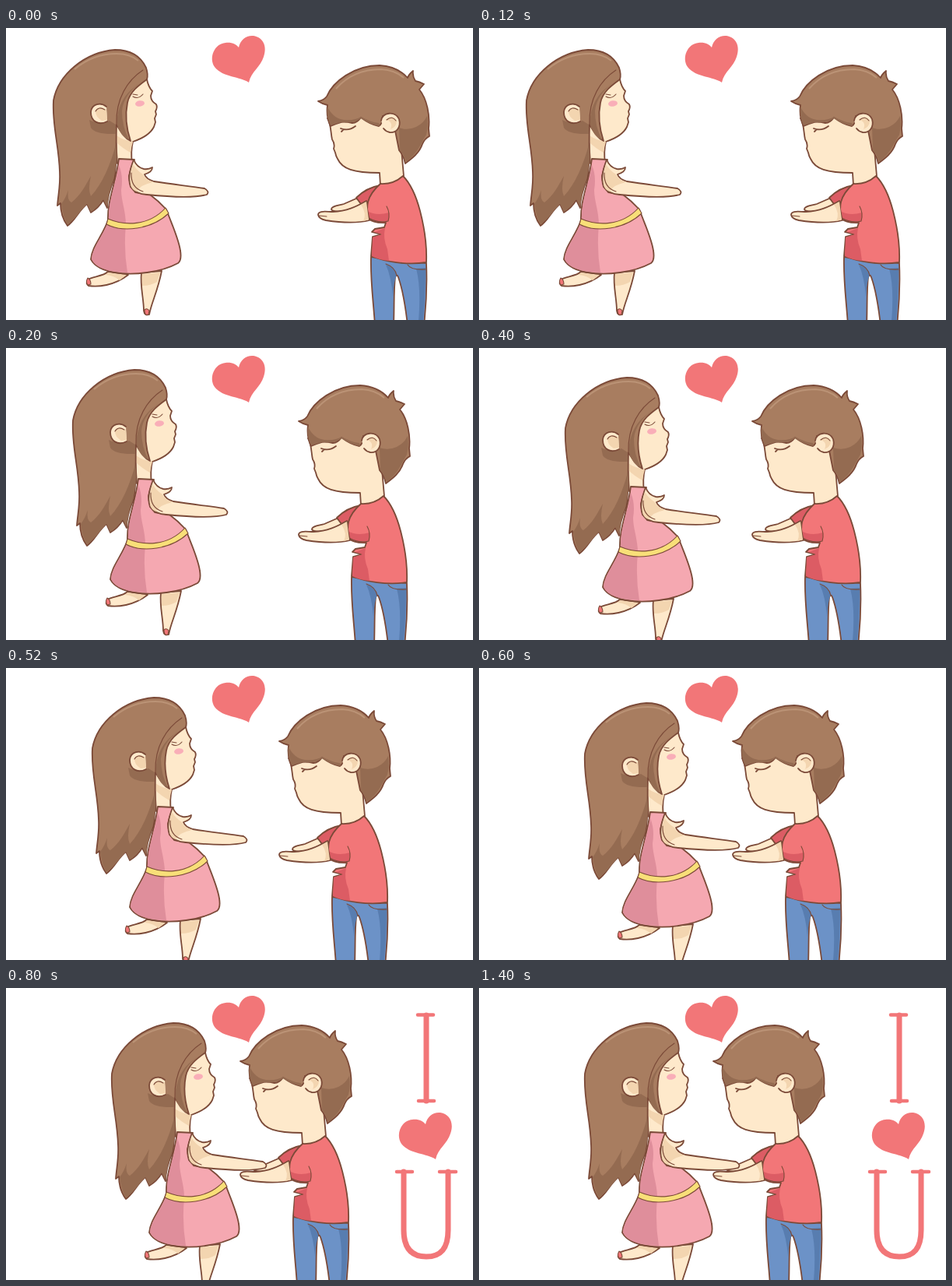
An HTML page for the animation above (1800 ms loop, 600x375 px).

```html
<!DOCTYPE html>
<html lang="en">
<head>
<meta charset="utf-8">
<title>I love you</title>
<style>
  html, body { margin: 0; width: 100%; height: 100%; overflow: hidden; background: #fff; }
  svg { display: block; width: 100%; height: 100%; }
  .ink { stroke: #7b4a38; stroke-width: 1.8; stroke-linejoin: round; stroke-linecap: round; }
  .line { fill: none; }
  .thin { stroke-width: 1.1; }
  .skin { fill: #fee9cb; }
  .tan { fill: #f3d5b0; }
  .hair { fill: #a87d60; }
  .shade { fill: #946b51; }
  .pink { fill: #f5a8b1; }
  .rose { fill: #df8e9b; }
  .red { fill: #f27678; }
  .wine { fill: #dc5c64; }
  .blue { fill: #6c92c7; }
  .navy { fill: #587db0; }
  .letter { fill: none; stroke: #f27678; stroke-linecap: round; }
</style>
</head>
<body>
<svg viewBox="0 0 600 375" preserveAspectRatio="none">
  <defs>
    <path id="heart" class="red" d="M312 70C301 62 279 64 268 50C260 38 268 20 282 19C290 18 296 21 299 25C301 15 309 9 318 10C330 12 336 23 331 37C327 50 315 56 312 70Z"/>
  </defs>
  <use href="#heart"/>

  <g id="boy">
    <!-- jeans -->
    <path class="blue ink" d="M469 294C468 325 472 350 474 382H498C499 358 498 338 500 320Q502 315 504 320C509 334 513 355 516 382H537C540 355 541 325 540 302Z"/>
    <path class="navy" d="M488 304Q499 306 502 317Q498 326 497 345Q495 319 488 304ZM527 309L539 308C539 332 538 355 536 376H530C532 352 532 328 527 309Z"/>
    <path class="line ink thin" d="M488 303Q500 307 502 318M516 304Q520 311 539 310"/>
    <!-- far arm -->
    <path class="skin ink" d="M418 233C418 228 428 228 434 226L450 219L462 225L442 233C434 236 420 237 418 233Z"/>
    <path class="wine ink" d="M481 202C469 204 459 209 450 218L456 226L470 222Z"/>
    <!-- neck and face -->
    <path class="skin ink" d="M413 116C418 124 417 135 419 143Q423 149 421 155L423 160Q424 165 426 168C432 181 446 186 480 186L481 202Q496 202 511 190L507 145L486 108L430 100Z"/>
    <path class="line ink" d="M430 129Q440 133 449 126M433 131L431 133"/>
    <!-- shirt -->
    <path class="red ink" d="M481 200Q498 201 510 190C520 200 527 216 532 235C538 258 541 278 540 301C515 305 487 300 469 293L471 268L482 265L470 262L474 258L486 256L488 250Q472 251 465 244C463 230 462 217 481 200Z"/>
    <path class="wine" d="M471 269L483 265L474 262L487 257Q484 270 490 284L492 299Q479 298 470 293Z"/>
    <path class="wine" d="M464 235Q476 242 492 237Q493 244 490 249Q475 251 466 244Z"/>
    <path class="line ink thin" d="M466 244Q478 251 491 248M489 229Q494 238 491 248"/>
    <!-- near arm -->
    <path class="skin ink" d="M401 240C401 234 411 236 420 236C438 235 449 230 463 222Q464 236 467 247C451 251 430 250 411 247Q402 245 401 240Z"/>
    <path class="tan" d="M456 227L463 223L466 246L459 248Q464 238 456 227Z"/>
    <path class="line ink thin" d="M402 241L412 242"/>
    <!-- hair -->
    <path class="hair ink" d="M401 94Q408 93 412 88C420 69 447 48 480 48C498 49 508 55 516 64Q517 60 523 55Q522 62 526 68Q531 69 537 72L531 79C541 91 545 113 543 129L544 139Q538 142 535 149C531 161 521 168 513 174Q511 164 505 157L500 132L484 113Q484 123 479 126Q468 124 456 115Q451 122 445 122Q435 120 431 121Q424 123 417 126Q411 114 413 99Q407 98 401 94Z"/>
    <path class="shade" d="M413 101Q420 116 434 118Q449 119 456 114Q469 121 479 122L480 126Q468 124 456 116Q448 123 431 121L417 125Q411 113 413 101ZM505 128Q516 132 527 127Q537 122 541 113Q543 126 540 137C532 150 529 161 514 172Q511 162 506 157Z"/>
    <path class="line" stroke="#bb9376" stroke-width="2" d="M424 78Q446 53 482 53Q500 54 511 64"/>
    <path class="skin ink" d="M482 119C483 108 500 106 505 117C508 128 501 135 493 134Q488 133 485 129"/>
    <path class="tan" d="M488 118Q497 111 502 119Q502 127 494 130Q498 120 488 118Z"/>
    <path class="line ink thin" d="M489 118Q496 112 501 119"/>
  </g>

  <g id="girl">
    <!-- legs -->
    <path class="skin ink" d="M131 313C125 319 111 319 105 323Q102 328 106 331C118 333 139 331 157 317Z"/>
    <path class="tan" d="M131 314L155 317L146 324Q139 318 128 317Z"/>
    <path class="red ink thin" d="M105 321Q109 323 109 329L105 330Q102 326 105 321Z"/>
    <path class="skin ink" d="M174 314C172 332 177 347 177 363Q178 370 184 368C187 352 195 338 200 312Z"/>
    <path class="tan" d="M175 316L198 314L194 326Q186 331 175 331Z"/>
    <path class="red ink thin" d="M178 362Q181 359 184 363L183 368Q178 370 178 362Z"/>
    <!-- neck and face -->
    <path class="skin ink" d="M140 125L143 174H162Q160 158 163 146C175 142 186 135 190 127L192 121L191 116L193 111L192 107Q195 102 193 98Q186 94 186 87L188 81Q183 76 181 66L150 62Z"/>
    <path class="tan" d="M142 138Q150 144 163 146Q161 153 160 160Q149 154 142 147Z"/>
    <path class="line ink thin" d="M163 88Q170 92 176 85M163 85L169 86"/>
    <ellipse cx="172" cy="97" rx="6" ry="3.8" fill="#f9aeb8" transform="rotate(-8 172 97)"/>
    <!-- dress -->
    <path class="pink ink" d="M145 168L165 169Q160 180 158 190Q158 202 166 211L185 214Q196 222 206 233C213 252 222 271 224 286Q226 298 221 302C199 314 164 318 140 314Q116 310 109 297C110 281 124 267 131 247C130 221 141 200 145 168Z"/>
    <path class="rose" d="M145 176Q151 190 148 208C148 222 154 235 154 253Q151 284 156 314Q117 313 110 297C111 282 125 267 132 247C131 221 142 200 145 176Z"/>
    <path d="M131 245C152 254 183 255 205 231L209 238C187 259 150 263 129 252Z" fill="#f8df78" class="ink thin"/>
    <!-- arm -->
    <path class="skin ink" d="M164 169Q168 179 177 181Q183 182 188 179Q188 185 178 188Q180 194 190 197C214 201 238 203 255 206Q262 210 258 214C240 219 211 217 181 214Q166 213 160 204C156 192 160 180 164 169Z"/>
    <path class="tan" d="M163 175Q168 183 176 188Q178 194 189 198Q173 201 168 210Q161 208 160 200Q159 188 163 175Z"/>
    <path class="line ink thin" d="M161 186Q160 205 176 210"/>
    <!-- hair -->
    <path class="hair ink" d="M181 66Q183 60 180 51C173 36 160 28 140 28C101 31 67 60 61 93C59 125 68 150 69 185C70 202 67 214 66 228L70 225Q70 242 79 254C89 247 93 235 104 226L109 237Q119 231 125 221L130 231C130 220 133 208 139 194C143 175 141 150 142 124C148 134 152 141 160 145C154 127 153 111 156 96C159 82 170 74 181 66Z"/>
    <path class="shade" d="M107 118Q121 125 133 119L141 124V136Q115 137 109 128Z"/>
    <path class="shade" d="M141 150C144 167 141 180 138 195Q132 210 130 230L125 220Q117 232 109 236L104 226C95 235 89 246 79 252Q74 245 71 226Q77 218 80 208Q78 221 84 224C95 216 103 201 109 190Q105 208 109 216C124 200 134 176 141 150Z"/>
    <path class="shade" d="M178 67C161 77 150 91 149 107Q149 126 158 144Q146 138 142 122Q144 95 160 80Q168 73 178 67Z"/>
    <path class="line ink thin" d="M176 54C156 67 141 91 142 123"/>
    <path class="line" stroke="#bb9376" stroke-width="2" d="M88 53Q112 33 142 33Q159 33 170 42"/>
    <path class="skin ink" d="M130 120C118 126 109 119 109 108C110 97 122 95 129 101"/>
    <path class="tan" d="M129 105Q120 99 115 107Q115 114 123 119L130 118Z"/>
    <path class="line ink thin" d="M127 105Q119 100 115 107"/>
  </g>

  <g id="message" role="img" aria-label="I love U">
    <path class="letter" stroke-width="4.5" d="M529 34.5H549M530 145H550M502 236H522M557 236H578"/>
    <path class="letter" stroke-width="7" stroke-linecap="butt" d="M540 35V145M511 236V311C511 334 521 345 540 345C559 345 568 334 568 311V236"/>
    <use href="#heart" x="240" y="150"/>
  </g>
</svg>
<script>
  const STEP = 200, LOOP = 1800;
  const girlPath = [[0, 0], [25, 0], [50, 10], [75, 17]];
  const boyStride = -25;
  const [boy, girl, message] = ["boy", "girl", "message"].map(id => document.getElementById(id));
  const move = (part, x, y) => part.setAttribute("transform", `translate(${x} ${y})`);

  function draw(ms) {
    const pose = Math.min(4, Math.floor(ms % LOOP / STEP));
    move(girl, ...girlPath[Math.min(3, pose)]);
    move(boy, boyStride * pose, 0);
    message.setAttribute("visibility", pose === 4 ? "visible" : "hidden");
  }

  const start = performance.now();
  function tick(now) {
    draw(Math.max(0, now - start));
    requestAnimationFrame(tick);
  }
  draw(0);
  requestAnimationFrame(tick);
</script>
</body>
</html>
```
